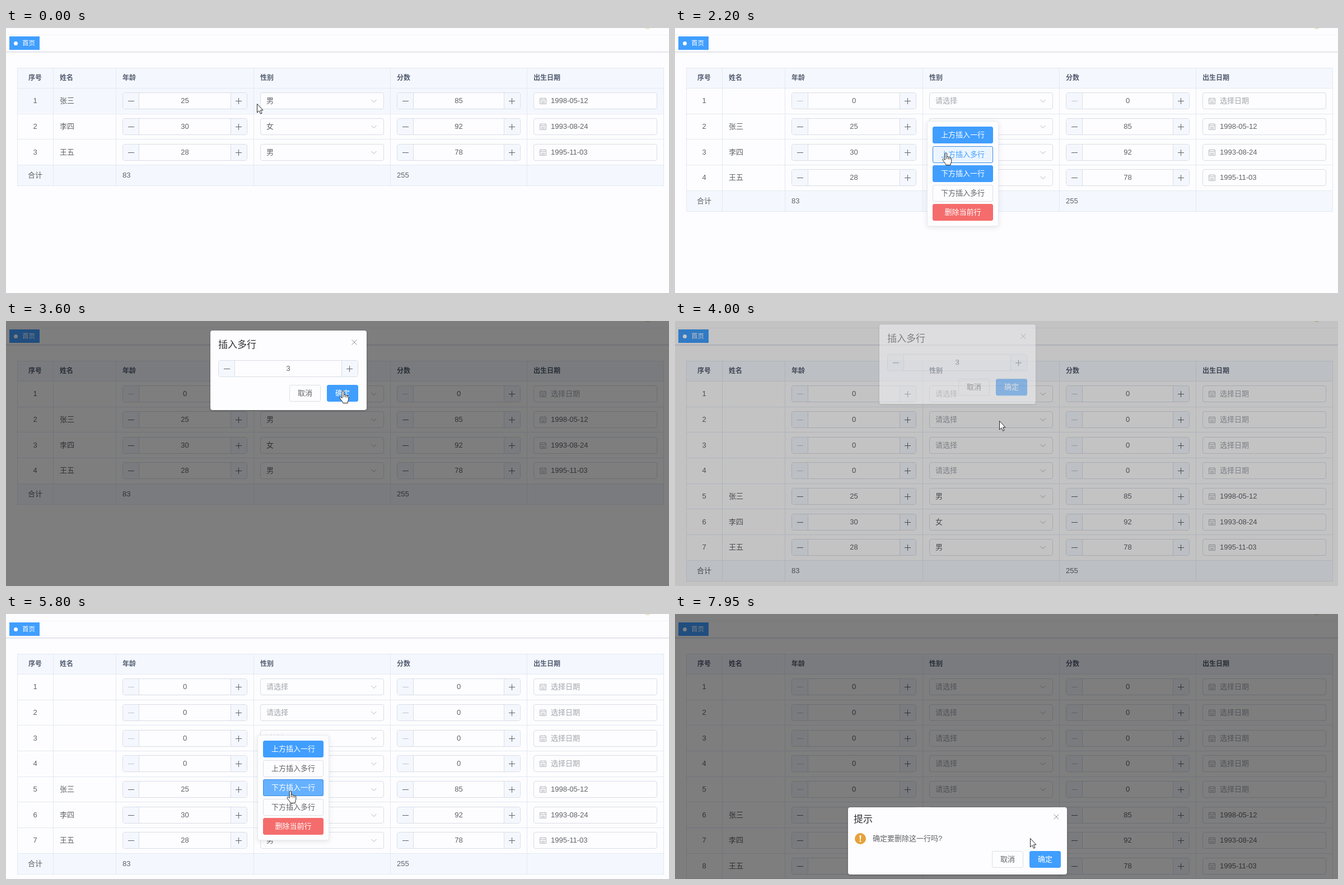
An HTML page that plays this animation: 1184x473 px, repeating every 8000 ms.

```html
<!DOCTYPE html>
<html lang="zh-CN">
<head>
<meta charset="utf-8">
<title>表格插入行</title>
<style>
html, body { margin: 0; width: 100%; height: 100%; overflow: hidden; background: #fdfdff; }
#stage {
  position: relative; width: 1184px; height: 473px; overflow: hidden; background: #fdfdff;
  font: 13px "Liberation Sans", "Noto Sans CJK SC", "Noto Sans CJK", sans-serif; color: #606266;
}
#stage div, #stage svg { position: absolute; box-sizing: border-box; }
.txt { white-space: nowrap; height: 20px; line-height: 20px; }
.mid { width: 160px; text-align: center; }
.head { font-size: 12px; font-weight: bold; color: #515a6e; }
.title { font-size: 17px; color: #303133; }
.hint { color: #a3a6ad; }
.line { background: #e3e8f1; }
.tint { background: #f4f8fe; }
.box { border: 1px solid #d9dde6; border-radius: 4px; background: #fdfdff; overflow: hidden; }
.btn { height: 30px; line-height: 28px; text-align: center; border: 1px solid #dcdfe6; border-radius: 3px; background: #fdfdff; white-space: nowrap; }
.btn.primary { background: #409eff; border-color: #409eff; color: #fff; font-weight: 500; }
.btn.danger { background: #f56c6c; border-color: #f56c6c; color: #fff; font-weight: 500; }
.btn.lit { background: #ecf5ff; border-color: #c6e2ff; color: #409eff; }
.btn.primary.lit { background: #66b1ff; border-color: #66b1ff; color: #fff; }
.btn.danger.lit { background: #f78989; border-color: #f78989; color: #fff; }
.btn.lit.down { border-color: #3a8ee6; }
.panel { background: #fdfdff; border-radius: 4px; box-shadow: 0 1px 3px rgba(0,0,0,.3); }
.menu { width: 128px; height: 188px; background: #fdfdff; border: 1px solid #e8ebf2; border-radius: 4px; box-shadow: 0 2px 10px rgba(0,0,0,.1); }
.shade { inset: 0; background: rgba(0,0,0,.5); }
svg { fill: none; stroke: #606266; stroke-width: 1; overflow: visible; }
</style>
</head>
<body>
<div id="stage"></div>
<script>
const LOOP = 8000, PITCH = 45.65, TOP = 107.4;
const COLS = [20, 84, 196, 442, 686, 930, 1174];
const stage = document.getElementById('stage');

function add(parent, cls, x, y, w, h, text) {
  const el = document.createElement('div');
  el.className = cls;
  el.style.left = x + 'px';
  el.style.top = y + 'px';
  if (w) el.style.width = w + 'px';
  if (h) el.style.height = h + 'px';
  if (text !== undefined) el.textContent = text;
  parent.append(el);
  return el;
}
const label = (p, x, cy, text, cls = '') => add(p, 'txt ' + cls, x, cy - 10, 0, 0, text);
const centred = (p, cx, cy, text, cls = '') => label(p, cx - 80, cy, text, 'mid ' + cls);

// An icon whose path is drawn around the point (x, y).
function icon(parent, x, y, path, color = '#606266', extra = '') {
  const holder = document.createElement('template');
  holder.innerHTML = `<svg width="1" height="1" style="left:${x}px;top:${y}px;stroke:${color}"><path d="${path}"/>${extra}</svg>`;
  const el = holder.content.firstChild;
  parent.append(el);
  return el;
}
const MINUS = 'M-5 .5H6', PLUS = 'M-5 .5H6M.5-5V6', CROSS = 'M-4.5-4.5L4.5 4.5M4.5-4.5L-4.5 4.5';
const CHEVRON = 'M-4.5-2L0 2.5L4.5-2';
const CALENDAR = 'M-5.5-4.5H5.5V5.5H-5.5ZM-5.5-1.5H5.5M-3.5 1.5H3.5M-3.5 3.5H3.5M-3-5.5V-3.5M3-5.5V-3.5';

function stepper(p, x, y, w, value, min) {
  const box = add(p, 'box', x, y, w, 30);
  add(box, 'tint', 0, 0, 29, 28).style.borderRight = '1px solid #d9dde6';
  add(box, 'tint', w - 31, 0, 29, 28).style.borderLeft = '1px solid #d9dde6';
  const minus = icon(p, x + 15, y + 15, MINUS);
  icon(p, x + w - 16, y + 15, PLUS);
  const text = centred(p, x + w / 2, y + 15, '');
  const set = v => {
    text.textContent = v;
    minus.style.stroke = v <= min ? '#c0c4cc' : '#606266';
  };
  set(value);
  return set;
}

// Page frame
add(stage, '', 0, 12, 1184, 1).style.background = '#f1f3f8';
add(stage, '', 1140, -9, 12, 11).style.cssText += 'border-radius:6px;background:#efe3c4';
const strip = add(stage, '', 0, 42, 1184, 1);
strip.style.cssText += 'background:#d8dce8;box-shadow:0 1px 2px rgba(0,0,0,.1)';
add(stage, '', 6, 15, 54, 24).style.background = '#409eff';
add(stage, '', 14, 24, 7, 7).style.cssText += 'border-radius:50%;background:#fff';
label(stage, 29, 27, '首页').style.cssText += 'color:#fff;font-size:11.5px';

// Tables, one for each step of the story
const blank = ['', 0, '', 0, ''];
const people = [
  ['张三', 25, '男', 85, '1998-05-12'],
  ['李四', 30, '女', 92, '1993-08-24'],
  ['王五', 28, '男', 78, '1995-11-03']
];
const lineY = i => Math.round(TOP + PITCH * i - .3);

function drawRow(p, row, i) {
  const [name, age, sex, score, date] = row;
  const y = Math.round(115.3 + PITCH * i), cy = y + 15;
  centred(p, 52, cy, i + 1);
  label(p, 96, cy, name);
  stepper(p, 208, y, 223, age, 0);
  add(p, 'box', 454, y, 221, 30);
  label(p, 465, cy, sex || '请选择', sex ? '' : 'hint');
  icon(p, 657, cy, CHEVRON, '#b0b4bd');
  stepper(p, 698, y, 221, score, 0);
  add(p, 'box', 942, y, 221, 30);
  icon(p, 959, cy, CALENDAR, '#b4b7be');
  label(p, 973, cy, date || '选择日期', date ? '' : 'hint');
}

function drawTable(blanks) {
  const p = add(stage, '', 0, 0, 1184, 473);
  const rows = [...Array(blanks).fill(blank), ...people];
  const end = lineY(rows.length);
  add(p, 'tint', 20, 71, 1155, 36);
  add(p, 'tint', 20, end, 1155, 37);
  const hover = add(p, 'tint', 20, 0, 1155, 45);
  ['序号', '姓名', '年龄', '性别', '分数', '出生日期'].forEach((s, i) =>
    i ? label(p, COLS[i] + 12, 88.5, s, 'head') : centred(p, 52, 88.5, s, 'head'));
  for (const x of COLS) add(p, 'line', x, 71, 1, end + 37 - 71);
  add(p, 'line', 20, 71, 1155, 1);
  for (let i = 0; i <= rows.length; i++) add(p, 'line', 20, lineY(i), 1155, 1);
  add(p, 'line', 20, end + 37, 1155, 1);
  rows.forEach((r, i) => drawRow(p, r, i));
  centred(p, 52, end + 18.5, '合计');
  label(p, 208, end + 18.5, '83');
  label(p, 698, end + 18.5, '255');
  return { el: p, hover, count: rows.length };
}
const tables = [0, 1, 4, 5].map(drawTable);
const tableTimes = [0, 650, 3830, 5900];

// Context menu
const menu = add(stage, 'menu', 0, 0);
const items = [
  ['上方插入一行', 'primary'], ['上方插入多行', ''], ['下方插入一行', 'primary'],
  ['下方插入多行', ''], ['删除当前行', 'danger']
].map(([text, cls], i) => {
  const y = Math.round(9 + 34.5 * i);
  add(menu, 'btn ' + cls, 9, y, 108, 30, text);
  return add(menu, 'btn lit ' + cls, 9, y, 108, 30, text);
});
// open, close, x, y
const menuTimes = [[100, 650, 449, 138], [1400, 2250, 450, 166], [5050, 5900, 449, 216], [6750, 7520, 451, 248]];

// Dialogs
const shade = add(stage, 'shade', 0, 0);
function buttons(p, x, y) {
  add(p, 'btn', x, y, 56, 30, '取消');
  add(p, 'btn primary', x + 67, y, 56, 30, '确定');
}
const dialog = add(stage, 'panel', 365, 17, 279, 142);
label(dialog, 14, 26, '插入多行', 'title');
icon(dialog, 257, 21, CROSS, '#909399');
const setCount = stepper(dialog, 14, 53, 250, 1, 1);
buttons(dialog, 141, 97);

const confirmBox = add(stage, 'panel', 309, 345, 391, 120);
label(confirmBox, 10, 22, '提示', 'title');
icon(confirmBox, 372, 17, CROSS, '#909399');
icon(confirmBox, 22, 56, '', 'none', '<circle r="10" fill="#e6a23c"/><path d="M-1.4-6H1.4L.8 2H-.8Z" fill="#fff"/><circle cy="4.6" r="1.4" fill="#fff"/>');
label(confirmBox, 44, 56, '确定要删除这一行吗?');
buttons(confirmBox, 257, 78);

// Pointers
const arrow = icon(stage, 0, 0, 'M.5 .5V16L4 12.7L6.6 18.2L9 17.1L6.5 11.8H11Z', '#222');
arrow.style.fill = '#fff';
const hand = icon(stage, 0, 0, 'M-1.8 1.2C-1.8-.6 1.4-.6 1.4 1.2V7C2.2 6 4.2 6.2 4.4 7.6C5.4 6.8 7 7.2 7.2 8.6C8.4 8 9.8 8.8 9.8 10.2V14C9.8 16.4 8.2 17.6 8.2 21.5H-.2C-.6 18.6-3.4 16.6-5.6 13C-6.8 11-4.8 9.6-3.2 11L-1.8 12.6Z', '#222',
  '<path d="M1.4 7V11M4.4 8V11.4M7.2 9V11.8"/>');
hand.style.fill = '#fff';

const path = [
  [0, 448, 135], [60, 449, 138], [150, 449, 138], [430, 490, 164], [700, 490, 164],
  [1250, 450, 166], [1480, 450, 166], [1950, 484, 223], [2280, 484, 223],
  [2600, 621, 183], [2950, 613, 85], [3400, 613, 85], [3650, 601, 130], [3850, 601, 130],
  [4000, 579, 178], [4200, 540, 200], [4850, 449, 216], [5120, 449, 216],
  [5650, 508, 316], [5950, 508, 316], [6600, 451, 248], [6950, 451, 248],
  [7100, 492, 322], [7200, 502, 365], [7300, 520, 408], [7560, 522, 410],
  [7950, 634, 400], [8000, 646, 412]
];
const clamp = v => Math.min(1, Math.max(0, v));

function pointer(t) {
  const i = Math.max(1, path.findIndex(k => k[0] > t));
  const [t0, x0, y0] = path[i - 1], [t1, x1, y1] = path[i];
  const u = clamp((t - t0) / (t1 - t0)), e = u * u * (3 - 2 * u);
  return [x0 + (x1 - x0) * e, y0 + (y1 - y0) * e];
}
const inside = ([x, y], l, t, w, h) => x >= l && x < l + w && y >= t && y < t + h;
const show = (el, on) => { el.style.display = on ? 'block' : 'none'; };

function fadePanel(el, p) {
  show(el, p > 0);
  el.style.opacity = p;
  el.style.transform = `translateY(${-20 * (1 - p)}px)`;
}

function render(t) {
  const at = pointer(t);
  const stepNow = tableTimes.filter(s => t >= s).length - 1;
  const open = menuTimes.find(m => t >= m[0] && t < m[1]);
  const asking = clamp((t - 2260) / 300) * (1 - clamp((t - 3840) / 300));
  const warning = clamp((t - 7560) / 300);
  let onButton = false;

  show(menu, open);
  if (open) {
    const [from, , mx, my] = open;
    menu.style.left = mx + 'px';
    menu.style.top = my + 'px';
    items.forEach((el, i) => {
      const hit = s => inside(pointer(s), mx + 10, my + 10 + 34.5 * i, 108, 30);
      // The highlight trails the pointer by a 100 ms fade.
      let sum = 0;
      for (let k = 0; k < 10; k++) if (t - k * 10 >= from && hit(t - k * 10)) sum++;
      el.style.opacity = sum / 10;
      el.classList.toggle('down', t > open[1] - 110);
      onButton = onButton || hit(t);
    });
  }

  const blocked = asking > 0 || warning > 0 || (open && inside(at, open[2] + 1, open[3] + 1, 127, 187));
  const over = Math.floor((at[1] - TOP) / PITCH);
  tables.forEach((table, i) => {
    show(table.el, i === stepNow);
    show(table.hover, !blocked && over >= 0 && over < table.count);
    table.hover.style.top = lineY(over) + 'px';
  });

  show(shade, asking || warning);
  shade.style.opacity = Math.max(asking, warning);
  fadePanel(dialog, asking);
  fadePanel(confirmBox, warning);
  setCount(1 + (t >= 3080) + (t >= 3280));

  if (asking === 1) onButton = inside(at, 599, 70, 30, 30) || inside(at, 573, 115, 56, 30);
  else if (!blocked) onButton = inside(at, 454, TOP, 221, PITCH * tables[stepNow].count) && (at[1] - 115.3) % PITCH < 30;
  show(arrow, !onButton);
  show(hand, onButton);
  for (const el of [arrow, hand]) el.style.transform = `translate(${Math.round(at[0])}px,${Math.round(at[1])}px)`;
}

const start = performance.now();
function tick() {
  render((performance.now() - start) % LOOP);
  requestAnimationFrame(tick);
}
render(0);
requestAnimationFrame(tick);
</script>
</body>
</html>
```
